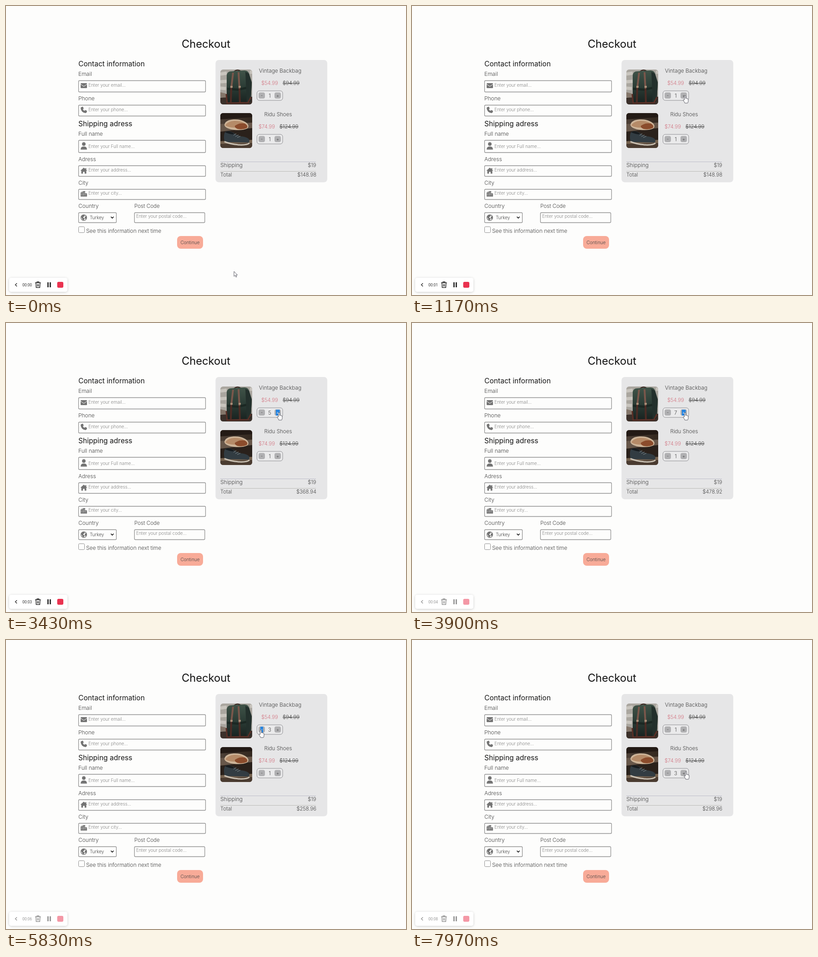
Write an HTML page that moves like this. It is 879 px wide and 637 px high and loops after 8 s.

```html
<!DOCTYPE html>
<html lang="en">
<head>
<meta charset="utf-8">
<title>Checkout</title>
<style>
html, body { margin: 0; width: 100%; height: 100%; overflow: hidden; background: #fdfdfc; }
svg { display: block; width: 879px; height: 637px; }
text { font: 300 12px Inter, "Open Sans", sans-serif; fill: #444; }
.title { font-size: 23.7px; font-weight: 400; fill: #111; }
.head { font-size: 15.6px; font-weight: 400; fill: #151515; }
.hint { font-size: 9.8px; fill: #858585; }
.small { font-size: 10px; }
.price { font-size: 11.2px; }
.sale { fill: #d27480; }
.old { text-decoration: line-through; }
.mid { text-anchor: middle; }
.end { text-anchor: end; }
.box { fill: none; stroke: #919191; stroke-width: 1.3; }
.icon { fill: #747474; }
.btn { fill: #b0b0b2; }
.sign { font-size: 10px; text-anchor: middle; }
.sel { fill: #2684e0; }
.cursor { fill: #fff; stroke: #4a4a55; stroke-width: .9; stroke-linejoin: round; }
.time { font: 400 8.4px Roboto, sans-serif; fill: #333; }
</style>
</head>
<body>
<svg viewBox="0 0 879 637">
  <defs>
    <clipPath id="bagClip"><rect x="471" y="140" width="70" height="77" rx="6"/></clipPath>
    <clipPath id="shoeClip"><rect x="471" y="236" width="70" height="77" rx="6"/></clipPath>
    <linearGradient id="leather" x2="0" y2="1">
      <stop stop-color="#405348"/><stop offset=".5" stop-color="#2b3c35"/><stop offset="1" stop-color="#18211f"/>
    </linearGradient>
    <linearGradient id="wall" x2="1" y2="0">
      <stop stop-color="#4d4037"/><stop offset="1" stop-color="#33281f"/>
    </linearGradient>
    <filter id="shadow" x="-10%" y="-30%" width="120%" height="170%">
      <feDropShadow dx="0" dy="1" stdDeviation="2.5" flood-opacity=".2"/>
    </filter>
  </defs>
  <rect width="879" height="637" fill="#fdfdfc"/>

  <text class="title mid" x="439.5" y="92">Checkout</text>

  <g>
    <text class="head" x="159" y="133">Contact information</text>
    <text x="159" y="154">Email</text>
    <text x="159" y="208">Phone</text>
    <text class="head" x="159" y="265">Shipping adress</text>
    <text x="159" y="286">Full name</text>
    <text x="159" y="342">Adress</text>
    <text x="159" y="394">City</text>
    <text x="159" y="445">Country</text>
    <text x="282" y="445" style="font-size:11.6px">Post Code</text>
    <text x="176" y="500">See this information next time</text>
  </g>

  <g class="box">
    <rect x="159.5" y="164.5" width="279" height="25" rx="2"/>
    <rect x="159.5" y="218.5" width="279" height="24" rx="2"/>
    <rect x="159.5" y="296" width="279" height="27" rx="2"/>
    <rect x="159.5" y="352" width="279" height="23.5" rx="2"/>
    <rect x="159.5" y="404" width="279" height="22.5" rx="2"/>
    <rect x="159.5" y="455.5" width="83" height="22" rx="2"/>
    <rect x="282.3" y="455.5" width="154.5" height="22" rx="2"/>
    <rect x="159.5" y="486.5" width="13" height="13" rx="2" stroke-width="1"/>
  </g>

  <text class="hint" x="181" y="178">Enter your email...</text>
  <text class="hint" x="181" y="232">Enter your phone...</text>
  <text class="hint" x="181" y="312.5">Enter your Full name...</text>
  <text class="hint" x="181" y="364.5">Enter your address...</text>
  <text class="hint" x="181" y="416">Enter your city...</text>
  <text class="hint" x="286" y="467">Enter your postal code...</text>
  <text class="small" x="184" y="470">Turkey</text>
  <path d="M230.5 464.5l3 3 3-3" fill="none" stroke="#111" stroke-width="1.7"/>

  <g class="icon">
    <rect x="164" y="170" width="14" height="11" rx="1.5"/>
    <path d="M164 172.5l7 4.7 7-4.7" fill="none" stroke="#fdfdfc"/>
    <path transform="translate(164 222)" d="M3.2.3L5 0l1.8 4L5 5.6Q6 8 8.4 9L10 7.2 14 9l-.3 2Q13.3 13.6 11 14 1 13 0 3 .3.8 3.2.3z"/>
    <circle cx="171" cy="304.2" r="3.9"/>
    <path d="M164 316.5q0-7 7-7t7 7z"/>
    <path d="M163.5 363l7.5-6.8 3.4 3v-2h2v3.9l2.1 1.9h-2v6.5h-3.7v-4h-3.6v4h-3.7V363z"/>
    <path d="M164 420v-9h2.5v-2.5H168v2.5h1v-3h5v5h4v7z"/>
    <path d="M166 413v5m3.3-5v5m2.7-8v8m3.3-3v3" stroke="#fdfdfc" stroke-dasharray="1.6 1.2" fill="none"/>
    <circle cx="171" cy="466.5" r="6.3" fill="none" stroke="#747474" stroke-width="1.4"/>
    <path d="M165 465l3-4 4-1 1 3-3 2v2l3 1-2 4-3-1-1-3zm8 1l2-3 2 1v4l-2 2-2-2z"/>
  </g>

  <rect x="376" y="507" width="57" height="28" rx="8" fill="#f8ab98"/>
  <text class="small mid" x="404.5" y="525">Continue</text>

  <rect x="460.5" y="119" width="245.5" height="269.5" rx="7" fill="#e6e6e7"/>

  <g clip-path="url(#bagClip)">
    <path fill="#aaa69f" d="M471 140h70v77h-70z"/>
    <path d="M471 150l14-2M471 167l14-1M471 181l12 1M536 146h5" stroke="#c9c5be" stroke-width="7"/>
    <path fill="#84766a" d="M471 190l12 3 2 10-14-2z"/>
    <path fill="#3b302a" d="M471 202l70-2v17h-70z"/>
    <path fill="none" stroke="#3b2a24" stroke-width="2.5" d="M501 145q7-7 15-1"/>
    <path fill="url(#leather)" d="M485 152q2-8 9-8l30-2q8 0 10 7l6 19-2 39q0 5-6 6l-40 2q-6 0-7-6z"/>
    <path fill="#1b2823" d="M486 180l24 2 28-6-1 5-27 6-24-2z"/>
    <path fill="#23302c" d="M526 145l8 4 6 20-2 38-9 6z"/>
    <path fill="none" stroke="#7a574b" stroke-width="4" d="M499 147l-4 34M511 146l2 36"/>
    <path fill="none" stroke="#4c2b24" stroke-width="4" d="M495 181l-1 31M513 182l1 31"/>
    <path fill="none" stroke="#5a2f26" stroke-width="3" d="M484 194l2 20 46-1 6-12"/>
    <path fill="#a98d77" d="M493 176h5v4h-5zm18 0h5v4h-5z"/>
  </g>

  <g clip-path="url(#shoeClip)">
    <path fill="url(#wall)" d="M471 236h70v77h-70z"/>
    <path fill="#231a15" d="M471 236h70v9l-70 5z"/>
    <path fill="#67574a" d="M471 260l70-3v14l-70 8z"/>
    <path fill="#2a211b" d="M471 277l70-8v26l-70 3z"/>
    <path fill="#75624f" d="M471 298l70-3v8l-70 2z"/>
    <path fill="#4a3b30" d="M471 304l70-2v11h-70z"/>
    <path fill="#cdb498" d="M480 262q2-11 20-12 18-1 29 8 7 7 1 12-10 5-29 3-20-3-21-11z"/>
    <path fill="#b58b68" d="M482 263q5-9 20-10 17 0 25 8-3 5-18 7-21 1-27-5z"/>
    <path fill="#8b4c2c" d="M503 264q9-7 22-5 8 5 4 10-8 4-20 2-7-3-6-7z"/>
    <path fill="#323c42" d="M480 298q-3-14 2-21 9-3 17 2 8 6 17 8 16 2 19 8l-1 6-53-1z"/>
    <path fill="#171b1e" d="M481 278q7-4 17 1l4 4q-11 0-21-5z"/>
    <path fill="none" stroke="#c9c0b2" stroke-width="3" d="M480 299q15 6 32 7 18 1 23-4"/>
    <path fill="none" stroke="#858b8c" d="M500 285l6-4m-2 7l7-4m-3 6l7-3"/>
  </g>

  <text class="mid" x="602.5" y="147" style="font-size:11.9px">Vintage Backbag</text>
  <text class="price sale" x="561" y="174">$54.99</text>
  <text class="price old" x="608" y="174">$94.99</text>
  <text class="mid" x="598" y="243" style="font-size:11.6px">Ridu Shoes</text>
  <text class="price sale" x="555" y="270">$74.99</text>
  <text class="price old" x="601" y="270">$124.99</text>

  <g id="steppers"></g>

  <path d="M471 343.5h210" stroke="#bdbdca"/>
  <path d="M471 364.5h210" stroke="#bcbcb8"/>
  <text x="471" y="354.5">Shipping</text>
  <text class="price end" x="681.5" y="354.5">$19</text>
  <text x="471" y="376" style="font-size:11.3px">Total</text>
  <text class="price end" id="total" x="682" y="376"></text>

  <rect x="7" y="599" width="128" height="31" rx="5" fill="#fff" filter="url(#shadow)"/>
  <g id="bar">
    <path d="M24 611l-3.5 3.5 3.5 3.5" fill="none" stroke="#222" stroke-width="1.4"/>
    <text class="time" id="clock" x="36" y="617.5"></text>
    <path d="M64 610h12.5M68 610v-2h4.5v2M65.7 610l.6 10.5h8l.6-10.5M69 613v5m2.6-5v5" fill="none" stroke="#222" stroke-width="1.4"/>
    <path d="M92.3 609v11m5 0v-11" stroke="#222" stroke-width="2.7"/>
    <rect x="112.5" y="608" width="13.5" height="13" rx="3" fill="#ea3350"/>
  </g>

  <g class="cursor">
    <path id="arrow" d="M0 0v11l2.6-2.3 1.7 3.9 1.7-.7-1.7-3.8L7.6 8z"/>
    <path id="hand" d="M-1.3 9V.8q0-1.5 1.3-1.5T1.3.8V6q.2-1.3 1.3-1T3.7 6.2q.3-.9 1.2-.6T5.8 7q1.2-.4 1.2 1v3.5Q7 14 5.500 16H-.5Q-1 14-2.5 12.2L-4 9.800q-.3-1.300 1-1.200z"/>
  </g>
</svg>
<script>
const LOOP = 8000;
const $ = id => document.getElementById(id);

const stepper = (name, y) => `
  <rect x="551.5" y="${y}" width="56.5" height="21" rx="5" fill="#eaeaeb" stroke="#8d8d91"/>
  <rect class="btn" x="555" y="${y + 3.5}" width="14" height="13.5" rx="4"/>
  <rect class="btn" x="590" y="${y + 3.5}" width="14" height="13.5" rx="4"/>
  <rect class="sel" id="${name}MinusSel" x="559" y="${y + 4}" width="6" height="13"/>
  <rect class="sel" id="${name}PlusSel" x="593" y="${y + 4}" width="8.5" height="13"/>
  <text class="sign" id="${name}Minus" x="562" y="${y + 14}">-</text>
  <text class="sign" id="${name}Plus" x="597" y="${y + 14}">+</text>
  <text class="mid" id="${name}Qty" x="579.5" y="${y + 14.5}" style="font-size:11.3px"></text>`;
$('steppers').innerHTML = stepper('bag', 187) + stepper('shoe', 283);

const bagPlus = [2000, 2570, 2870, 3200, 3600, 3900];
const bagMinus = [5050, 5270, 5480, 5700, 5950, 6150];
const shoePlus = [7700, 7930];
// time, x, y of the pointer tip
const path = [
  [0, 501, 585], [70, 501, 585], [200, 540, 512], [370, 613, 372],
  [600, 613, 262], [830, 603, 212], [930, 601, 201], [1170, 600, 198],
  [4130, 600, 198], [4330, 576, 200], [4530, 560, 199],
  [6270, 560, 199], [6480, 578, 250], [6670, 599, 288], [7030, 602, 291], [LOOP, 602, 291]
];

const count = (times, t) => times.filter(s => t >= s).length;
const within = (t, a, b) => t >= a && t < b;
const show = (id, on) => $(id).style.display = on ? '' : 'none';

function pointer(t) {
  const i = path.findIndex(p => p[0] > t);
  const [a, b] = [path[i - 1], path[i]];
  const k = (t - a[0]) / (b[0] - a[0]);
  return [a[1] + (b[1] - a[1]) * k, a[2] + (b[2] - a[2]) * k];
}

function select(id, on) {
  show(id + 'Sel', on);
  $(id).style.fill = on ? '#fff' : '';
}

function draw(t) {
  const bags = 1 + count(bagPlus, t) - count(bagMinus, t);
  const shoes = 1 + count(shoePlus, t);
  $('bagQty').textContent = bags;
  $('shoeQty').textContent = shoes;
  $('total').textContent = '$' + (bags * 54.99 + shoes * 74.99 + 19).toFixed(2);
  $('clock').textContent = '00:0' + Math.floor((t + 220) / 1000);

  select('bagPlus', within(t, 2200, 3100) || within(t, 3430, 5000));
  select('bagMinus', within(t, 5200, 7600));
  select('shoeMinus', false);
  select('shoePlus', false);

  $('bar').style.opacity = 1 - 0.5 * Math.min(1, Math.max(0, (t - 3600) / 300));

  const [x, y] = pointer(t);
  const overButton = within(t, 880, 4200) || within(t, 4420, 6330) || t >= 6670;
  for (const id of ['arrow', 'hand']) $(id).setAttribute('transform', `translate(${x} ${y})`);
  show('arrow', !overButton);
  show('hand', overButton);
}

function tick() {
  draw(performance.now() % LOOP);
  requestAnimationFrame(tick);
}
tick();
</script>
</body>
</html>
```
